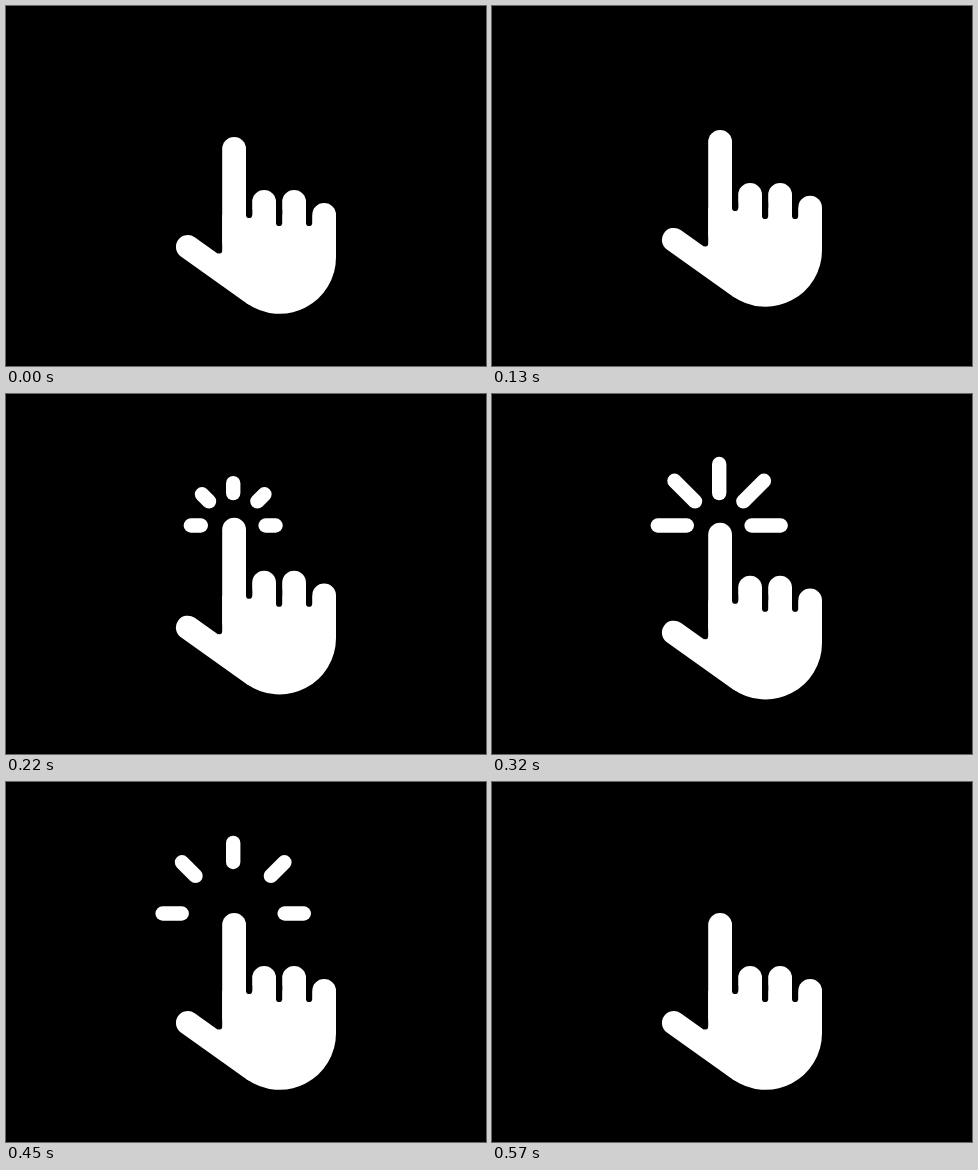
Recreate the animation shown at these times as an HTML page. Size 480 by 360 pixels, loop 1370 ms.

```html
<!DOCTYPE html>
<html lang="en">
<head>
<meta charset="utf-8">
<title>Tap</title>
<style>
html, body { margin: 0; width: 100%; height: 100%; overflow: hidden; background: #000; }
svg { display: block; width: 100vw; height: 100vh; }
line { stroke: #fff; stroke-linecap: round; }
</style>
</head>
<body>
<svg viewBox="0 0 480 360">
  <path id="splash" fill="#22b0ff"/>
  <g id="rays" stroke-width="14.4"></g>
  <g id="holes">
    <ellipse cx="227.5" cy="62.5" rx="4.2" ry="5.8"/>
    <ellipse cx="299.5" cy="132.5" rx="5" ry="4.5"/>
  </g>
  <g id="hand" stroke-width="23.8">
    <path fill="#fff" d="M216.2 208.8H330V251A56.5 56.5 0 0 1 240.7 297.3L211.5 247Q216.2 249 216.2 244Z"/>
  </g>
</svg>
<script>
const LOOP = 1370;
const byId = id => document.getElementById(id);
const clamp = v => Math.min(1, Math.max(0, v));
const ramp = (t, from, to) => clamp((t - from) / (to - from));
const mix = (a, b, k) => a + (b - a) * k;
const show = (el, on) => el.setAttribute("visibility", on ? "visible" : "hidden");

function setLine(el, x1, y1, x2, y2) {
  Object.entries({ x1, y1, x2, y2 }).forEach(([key, value]) => el.setAttribute(key, value));
}

function addLine(parent, ...ends) {
  const el = document.createElementNS("http://www.w3.org/2000/svg", "line");
  setLine(el, ...ends);
  return byId(parent).appendChild(el);
}

// Closed smooth curve through the points
function smooth(points) {
  const at = i => points[(i + points.length) % points.length];
  const handle = (i, sign) => at(i).map((v, k) => v + sign * (at(i + 1)[k] - at(i - 1)[k]) / 6);
  return "M" + at(0) + points.map((_, i) =>
    `C${handle(i, 1)} ${handle(i + 1, -1)} ${at(i + 1)}`).join("") + "Z";
}

// Fingers, the gaps between them, and the thumb
[143, 196, 196, 208.8].forEach((top, i) => {
  const x = 228.1 + 30 * i;
  addLine("hand", x, top, x, 235);
});
[209, 217, 217].forEach((bottom, i) => {
  const x = 243.1 + 30 * i;
  const gap = addLine("hand", x, 204, x, bottom);
  gap.style.stroke = "#000";
  gap.style.strokeWidth = 6.2;
});
addLine("hand", 181.8, 240.9, 247.4, 287.6);

byId("splash").setAttribute("d", smooth([
  [182, 82], [198, 82], [207, 77], [217, 72], [230, 73], [244, 69], [256, 73], [266, 80],
  [277, 85], [265, 101], [257, 110], [246, 114], [234, 112], [227, 103], [221, 107],
  [228, 115], [229, 131], [215, 128], [210, 116], [207, 105], [197, 99], [184, 88]
]));

const rays = Array.from({ length: 5 }, () => addLine("rays", 0, 0, 0, 0));

// Frames last 30 ms, with two longer ones in the middle
function snap(t) {
  const [from, step] = t < 250 ? [70, 30] : t < 390 ? [250, 70] : [390, 30];
  return from + Math.floor((t - from) / step) * step;
}

function draw(time) {
  const t = snap(time);

  const lift = 10 * (ramp(t, 40, 167) - ramp(t, 167, 367));
  byId("hand").setAttribute("transform", `translate(0 ${-lift})`);

  // Rays grow outward, then shrink toward their outer ends
  const head = ramp(t, 168, 368);
  const tail = ramp(t, 369, 531);
  rays.forEach((ray, i) => {
    const angle = Math.PI * (1 + i / 4);
    const inner = 32.4 + 1.8 * (i % 2);
    const outer = inner + 38.2;
    const point = k => {
      const r = mix(inner, outer, k);
      return [227.2 + r * Math.cos(angle), 131.5 + r * Math.sin(angle)];
    };
    setLine(ray, ...point(tail), ...point(head));
  });
  show(byId("rays"), head > 0 && t < 570);

  const splash = t === 510;
  show(byId("splash"), splash);
  show(byId("holes"), splash);
}

const start = performance.now();
function tick() {
  draw((performance.now() - start) % LOOP);
  requestAnimationFrame(tick);
}
tick();
</script>
</body>
</html>
```
